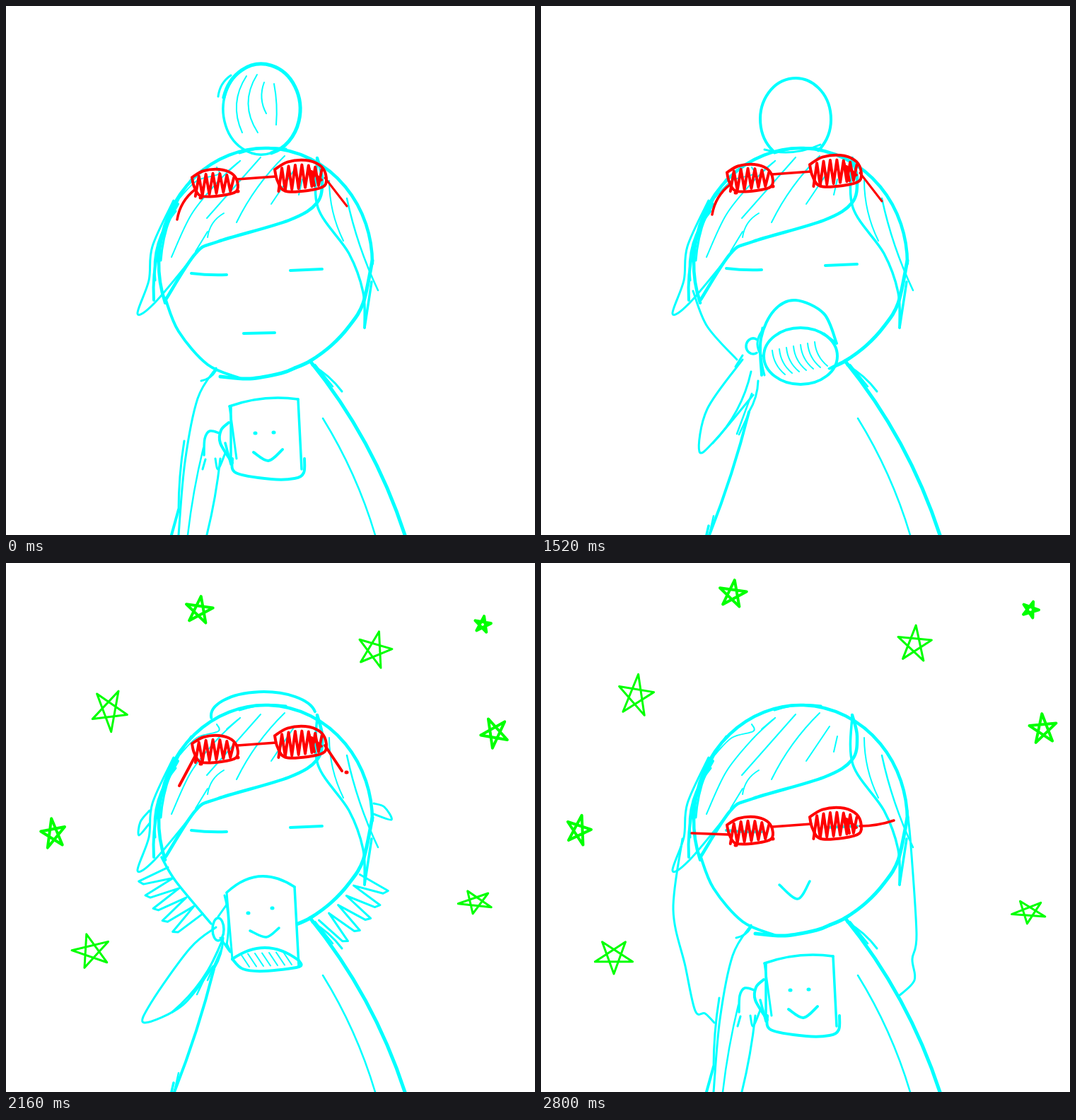
Recreate the animation shown at these times as an HTML page with a canvas. Size 748 by 748 pixels, loop 2.96 s.

```html
<!DOCTYPE html>
<html lang="en">
<head>
<meta charset="utf-8">
<title>Morning coffee</title>
<style>
html, body { margin: 0; width: 100%; height: 100%; overflow: hidden; background: #fff; }
canvas { display: block; width: 100vmin; height: 100vmin; }
</style>
</head>
<body>
<canvas id="stage" width="748" height="748"></canvas>
<script>
const ctx = document.getElementById('stage').getContext('2d');
const CYAN = '#0ff', RED = '#f00', GREEN = '#0f0';
const LOOP = 2960, RAD = Math.PI / 180;

function ink(width, trace) {
  ctx.beginPath();
  trace();
  ctx.lineWidth = width;
  ctx.stroke();
}

const pairs = nums => nums.flatMap((n, i) => i % 2 ? [] : [[n, nums[i + 1]]]);

// Smooth stroke through a few points.
function line(width, ...nums) {
  const pts = pairs(nums);
  const at = i => pts[Math.max(0, Math.min(pts.length - 1, i))];
  ink(width, () => {
    ctx.moveTo(...pts[0]);
    for (let i = 0; i < pts.length - 1; i++) {
      const [a, b, c, d] = [at(i - 1), at(i), at(i + 1), at(i + 2)];
      ctx.bezierCurveTo(b[0] + (c[0] - a[0]) / 6, b[1] + (c[1] - a[1]) / 6,
        c[0] - (d[0] - b[0]) / 6, c[1] - (d[1] - b[1]) / 6, ...c);
    }
  });
}

const poly = (width, pts) => ink(width, () => pts.forEach(p => ctx.lineTo(...p)));

// Single bend between two points.
function bow(width, x1, y1, x2, y2, bulge = 0) {
  const dx = x2 - x1, dy = y2 - y1, k = 2 * bulge / Math.hypot(dx, dy);
  ink(width, () => {
    ctx.moveTo(x1, y1);
    ctx.quadraticCurveTo((x1 + x2) / 2 + dy * k, (y1 + y2) / 2 - dx * k, x2, y2);
  });
}

const arc = (width, x, y, rx, ry, from = 0, to = 360) =>
  ink(width, () => ctx.ellipse(x, y, rx, ry, 0, from * RAD, to * RAD));

const dot = (x, y) => bow(5, x, y, x + 1, y);

function blank(...nums) {
  ctx.beginPath();
  pairs(nums).forEach(p => ctx.lineTo(...p));
  ctx.fill();
}

function hatch(n, x, y, stepX, stepY, w, h, bulge) {
  for (let i = 0; i < n; i++) {
    const px = x + i * stepX, py = y + i * stepY;
    bow(2, px, py, px + w, py + h, bulge);
  }
}

const onHead = (deg, k) => [367 + 151 * k * Math.cos(deg * RAD), 364 + 163 * k * Math.sin(deg * RAD)];

// Pointed locks along the head: each leaves at one angle, returns at the next.
function spikes(width, from, to, n, reach) {
  const step = (to - from) / n;
  const pts = [onHead(from, 1)];
  for (let i = 0; i < n; i++) {
    const deg = from + step * i;
    pts.push(onHead(deg, reach), onHead(deg + step * .3, reach - .03), onHead(deg + step, 1));
  }
  poly(width, pts);
}

function head() {
  arc(4.5, 367, 364, 151, 163, 160, 360);
  line(5, 518, 360, 505, 420, 485, 453, 460, 480, 430, 502, 408, 512);
  bow(3, 330, 208, 396, 202, 4);
}

function locks() {
  line(3, 237, 275, 207, 340, 202, 388, 186, 435, 210, 420, 262, 358);
  bow(4, 243, 280, 209, 416, -11);
  bow(3, 240, 290, 211, 388, -11);
  bow(3, 262, 245, 219, 360, -9);
  line(4.5, 226, 415, 268, 350, 300, 333, 400, 303, 440, 278, 447, 245, 440, 215);
  line(3.5, 440, 215, 441, 285, 485, 350, 505, 405, 507, 455);
  bow(3.5, 507, 455, 517, 390);
  bow(2, 457, 247, 477, 332, -5);
  bow(2.5, 482, 272, 526, 402, -4);
}

function strands() {
  line(2, 245, 272, 270, 247, 300, 238, 298, 228);
  line(2, 234, 355, 262, 295, 300, 248, 331, 219, 312, 235);
  bow(2, 284, 300, 360, 214);
  bow(2, 285, 327, 308, 293, 5);
  bow(2, 268, 347, 285, 319);
  bow(2, 326, 306, 394, 212, 5);
  bow(2, 375, 280, 408, 231);
  bow(2, 414, 267, 419, 245);
}

function rightArm() {
  bow(5, 430, 502, 564, 748, 13);
  bow(3, 433, 508, 475, 545, 3);
  bow(2.5, 437, 507, 462, 538);
  bow(2.5, 448, 583, 522, 748, 6);
}

const chin = () => line(5, 408, 512, 390, 519, 345, 527, 303, 524);
const jaw = () => line(4, 225, 413, 244, 460, 285, 507, 330, 526);
const jawOpen = () => line(4, 219, 412, 250, 473, 313, 521);
const jawThin = () => line(3, 215, 403, 235, 453, 277, 500);
const jawLow = () => line(3.5, 220, 416, 240, 450, 290, 510);
const mouth = () => bow(4, 336, 463, 380, 462);
const smileWide = () => line(3, 334, 451, 367, 472, 390, 444);
const smile = () => line(3.5, 337, 455, 363, 475, 380, 450);

function eyes() {
  bow(4, 262, 378, 312, 380, -1);
  bow(4, 402, 374, 447, 372);
}

function bunRound() {
  arc(5, 361, 146, 55, 64, -165, 75);
  arc(3.5, 361, 146, 54, 64, 75, 250);
  bow(3, 300, 128, 318, 98, 4);
  bow(2, 340, 99, 334, 179, -11);
  bow(2, 355, 97, 356, 179, -13);
  bow(2, 365, 108, 368, 152, -5);
  bow(2, 379, 110, 382, 168, 2);
}

function bunPlain() {
  arc(4, 360, 160, 50, 58, 130, 410);
  bow(3, 316, 203, 395, 196, -7);
}

function bunSquat() {
  arc(4, 358, 178, 48, 58, 150, 390);
  bow(3, 312, 205, 395, 196, -5);
}

function bunCone() {
  line(4, 302, 217, 311, 195, 320, 160, 357, 132, 392, 160, 405, 192, 420, 207);
  bow(2, 325, 173, 323, 207);
  bow(2, 352, 148, 345, 185, -4);
  bow(2, 366, 165, 371, 182);
  bow(2, 378, 163, 391, 185, 3);
  bow(3, 312, 205, 395, 196, -5);
}

const bunLow = () => arc(4, 362, 212, 70, 54, 175, 365);
const bunFlat = () => arc(4, 364, 216, 74, 34, 175, 350);
const bunGone = () => arc(3.5, 364, 220, 74, 29, 180, 340);

function tufts() {
  spikes(2.5, 155, 126, 3, 1.1);
  spikes(2.5, 28, 60, 3, 1.12);
}

const spikesLeft = () => spikes(3, 156, 126, 5, 1.3);
const spikesRight = () => spikes(3, 28, 60, 5, 1.3);

function wings() {
  line(3, 203, 350, 190, 366, 188, 385, 203, 368);
  line(3, 520, 340, 535, 345, 545, 363, 520, 355);
}

function shag() {
  line(3, 205, 350, 192, 370, 187, 433, 205, 425, 232, 395);
  line(3, 200, 430, 187, 515, 196, 518, 212, 463, 210, 485, 219, 493, 228, 540, 240, 524, 268, 565);
  line(3.5, 520, 335, 530, 375, 519, 400, 528, 465, 520, 462, 518, 490, 508, 488, 515, 530, 492, 515);
  line(3, 432, 507, 460, 537, 480, 545, 507, 587, 500, 545);
}

function hair(length) {
  ctx.translate(0, 390);
  ctx.scale(1, length);
  line(3, 200, 0, 187, 100, 204, 180, 218, 243, 232, 247, 245, 260);
  line(3, 518, -40, 523, 10, 531, 135, 525, 170, 528, 200, 505, 223);
}
const midHair = () => hair(.84);
const longHair = () => hair(1);

function hem() {
  bow(3.5, 237, 735, 234, 748);
  bow(2.5, 244, 721, 238, 748);
}

function torso() {
  bow(4, 294, 574, 238, 748, 3);
  bow(3, 307, 530, 294, 574, 3);
}

function shoulder() {
  line(3, 297, 512, 271, 555, 253, 645, 244, 748);
  bow(3, 276, 530, 297, 515, -3);
  bow(3, 252, 615, 244, 715, -2);
  bow(4, 244, 712, 234, 748);
}

function forearm() {
  bow(3, 303, 640, 276, 778, 3);
  bow(2.5, 279, 625, 254, 778, -3);
}

function grip() {
  line(3.5, 302, 604, 288, 601, 281, 612, 280, 635);
  line(4, 315, 589, 304, 600, 303, 618, 320, 646);
  line(3, 296, 640, 300, 655, 310, 632);
  bow(3.5, 310, 618, 318, 648);
  bow(3, 278, 655, 282, 641);
}

function armBent() {
  line(3, 283, 525, 240, 600, 212, 690, 220, 731, 280, 670, 305, 605);
  bow(2.5, 280, 545, 215, 720, -12);
  bow(2.5, 218, 715, 300, 600);
  bow(2, 283, 610, 220, 712);
  bow(3, 297, 512, 264, 572, -5);
  bow(2, 261, 512, 266, 515);
  bow(3, 275, 530, 290, 524);
  line(4, 310, 547, 298, 565, 300, 582, 313, 606);
  arc(4, 292, 588, 11, 20);
}

function armHigh() {
  line(3, 285, 500, 235, 570, 224, 630, 248, 612, 300, 550);
  bow(3, 297, 517, 243, 618, 8);
  bow(2.5, 298, 548, 277, 605);
  bow(2.5, 292, 580, 280, 606);
  arc(3.5, 300, 481, 10, 11, 60, 300);
  bow(3, 312, 460, 312, 495, -6);
  bow(3, 275, 510, 285, 494);
}

function armTilt() {
  line(3, 282, 502, 235, 565, 213, 618, 250, 600, 302, 555);
  bow(3, 305, 493, 238, 612, 12);
  arc(3, 301, 480, 11, 12, 60, 290);
  bow(3, 315, 457, 318, 487, -9);
  bow(3, 301, 463, 305, 491, -3);
}

function armLow() {
  line(3, 297, 515, 260, 545, 205, 622, 196, 650, 250, 625, 293, 570);
  bow(3, 305, 535, 235, 635, 8);
  bow(2.5, 303, 540, 270, 610);
  bow(2.5, 305, 545, 285, 590);
  arc(3.5, 300, 518, 8, 16);
  bow(3, 312, 483, 300, 500);
  line(3, 303, 530, 317, 550, 312, 538);
}

function cupFront() {
  blank(316, 566, 380, 554, 413, 556, 418, 655, 375, 669, 325, 660);
  bow(3, 316, 566, 326, 640);
  bow(3.5, 318, 567, 318, 646);
  bow(3.5, 316, 566, 413, 556, 6);
  bow(3.5, 413, 556, 418, 655);
  line(4, 422, 640, 421, 660, 408, 668, 375, 669, 325, 660, 320, 640);
  dot(352, 604);
  dot(378, 603);
  line(4, 350, 631, 371, 643, 391, 627);
}

function cupTilt() {
  blank(312, 466, 360, 443, 408, 458, 414, 570, 365, 577, 320, 560);
  bow(3.5, 312, 466, 408, 458, 19);
  bow(3.5, 408, 458, 414, 570);
  bow(3, 312, 466, 320, 560);
  bow(3, 309, 470, 312, 540, 4);
  bow(4, 320, 560, 414, 562, 17);
  line(4, 414, 562, 414, 571, 365, 577, 335, 574, 320, 560);
  hatch(7, 332, 553, 10, -.5, 12, 18);
  dot(342, 495);
  dot(376, 488);
  line(3.5, 345, 520, 368, 529, 386, 516);
}

function cupUp() {
  blank(312, 522, 311, 460, 330, 430, 360, 416, 400, 435, 418, 480, 418, 505, 365, 534);
  line(4, 312, 522, 311, 470, 330, 430, 360, 416, 400, 435, 418, 477);
  bow(3, 316, 522, 313, 455, 4);
  arc(4, 367, 495, 52, 40);
  hatch(7, 327, 487, 10, -2, 18, 34, -4);
  bow(3, 400, 463, 418, 477);
}

function cupSnout() {
  blank(317, 490, 324, 440, 362, 418, 403, 445, 413, 480, 385, 518, 330, 513);
  line(4, 317, 490, 324, 440, 362, 418, 403, 445, 415, 461);
  arc(4, 364, 479, 49, 42);
  bow(3, 305, 510, 319, 514, -2);
  bow(2.5, 333, 483, 341, 490, -2);
  bow(2.5, 367, 471, 376, 475, -2);
  bow(4, 392, 514, 432, 502);
}

function lens(x, y, rx, ry, strokes) {
  const outline = [-1, -.4, -.5, -.88, .2, -1, .75, -.7, 1, -.1, .95, .65, .3, .95, -.6, .98, -.9, .3, -1, -.4];
  line(4, ...outline.map((v, i) => i % 2 ? y + v * ry : x + v * rx));
  const scribble = [];
  for (let i = 0; i <= strokes; i++) {
    const k = 2 * i / strokes - 1;
    scribble.push([x + k * rx * .85, y + ry * (i % 2 ? -.7 + .3 * k * k : .8 - .2 * k)]);
  }
  poly(4, scribble);
}

function lenses() {
  lens(295, 250, 32, 19, 11);
  lens(416, 240, 36, 22, 13);
  poly(4, [[428, 228], [436, 254], [432, 234], [446, 246]]);
  dot(275, 271);
  dot(327, 262);
  bow(3.5, 327, 245, 382, 241);
}

function temples() {
  bow(3.5, 268, 259, 242, 302, -5);
  bow(3, 451, 243, 482, 283);
}

function templesBent() {
  bow(4, 268, 259, 245, 302);
  bow(4, 451, 245, 475, 281);
  dot(481, 283);
}

function templesWorn() {
  bow(3, 217, 258, 265, 260);
  bow(3.5, 227, 267, 272, 258, -3);
  bow(3.5, 451, 242, 503, 241);
}

function templesFlat() {
  bow(3.5, 213, 254, 265, 256);
  bow(3.5, 451, 244, 499, 236, -2);
}

const parts = { head, locks, strands, rightArm, chin, jaw, jawOpen, jawThin, jawLow, eyes, mouth, smile, smileWide,
  bunRound, bunPlain, bunSquat, bunCone, bunLow, bunFlat, bunGone, tufts, spikesLeft, spikesRight, wings, shag,
  midHair, longHair, hem, torso, shoulder, forearm, grip, armBent, armHigh, armTilt, armLow,
  cupFront, cupTilt, cupUp, cupSnout, lenses, temples, templesBent, templesWorn, templesFlat };

// near x, y; far x, y; radii; near and far angle of the first tip
const stars = [
  [273, 67, 271, 44, 20, 20, -82, -82], [521, 123, 528, 115, 25, 27, -75, -85],
  [674, 87, 692, 66, 12, 12, -80, -70], [146, 208, 134, 188, 26, 31, -60, -82],
  [691, 240, 710, 235, 20, 22, -45, -95], [67, 383, 53, 378, 18, 22, -99, -75],
  [664, 479, 690, 493, 25, 17, -45, -120], [121, 549, 103, 556, 28, 25, -105, 90]
];

function drawStar([nearX, nearY, farX, farY, rx, ry, nearTurn, farTurn], phase) {
  const near = phase === 'near', turned = phase === 'turned';
  const x = near ? nearX : farX - 3 * turned;
  const y = near ? nearY : farY + 5 * turned;
  const turn = near ? nearTurn : farTurn + 30 * turned;
  ink(rx < 22 ? 4 : 3, () => {
    for (let i = 0; i < 5; i++) {
      const a = (turn + i * 144) * RAD;
      ctx.lineTo(x + rx * Math.cos(a), y + ry * Math.sin(a));
    }
    ctx.closePath();
  });
}

const base = 'rightArm head locks strands ';
const sip = base + 'hem torso ';
const held = dy => ` shoulder forearm:${dy} cupFront:${dy} grip:${dy}`;
const glasses = (dy, arms = 'temples') => ` lenses:${dy} ${arms}:${dy}`;

// start time, parts as name:dy,dx in paint order, star phase
const poses = [
  [0, base + 'bunRound chin eyes mouth jaw' + held(0) + glasses(0)],
  [880, base + 'bunRound chin eyes mouth jawOpen hem cupFront:-42,-4 armBent' + glasses(0)],
  [1040, sip + 'bunRound eyes mouth jawLow cupTilt:32,2 armLow:32,9' + glasses(0)],
  [1200, sip + 'bunRound eyes jawLow cupTilt armLow' + glasses(0)],
  [1360, sip + 'bunRound eyes jawThin cupUp armHigh' + glasses(0)],
  [1520, sip + 'bunPlain eyes:-7 jawThin cupUp armHigh' + glasses(-7)],
  [1680, sip + 'bunSquat eyes:-11 jawThin cupSnout armTilt' + glasses(-11)],
  [1840, sip + 'bunCone eyes:-14 jawThin tufts cupSnout armTilt' + glasses(-14)],
  [2000, sip + 'bunLow eyes:-7 jawThin spikesLeft:-6,-8 spikesRight:-6 wings cupUp armHigh' + glasses(0)],
  [2160, sip + 'bunFlat eyes jawLow spikesLeft spikesRight wings cupTilt armLow' + glasses(13, 'templesBent'), 'near'],
  [2320, sip + 'bunGone eyes mouth jawLow spikesLeft:12,-4 spikesRight:14,4 wings:10 cupTilt:32,2 armLow:32,9' +
    glasses(65, 'templesBent'), 'turned'],
  [2480, base + 'bunGone chin jaw eyes smileWide shag' + held(-27) + glasses(124, 'templesWorn'), 'far'],
  [2640, base + 'chin jaw eyes smile midHair' + held(0) + glasses(126, 'templesWorn'), 'turned'],
  [2800, base + 'chin jaw eyes smile longHair' + held(0) + glasses(128, 'templesFlat'), 'far']
];

function drawPart(token) {
  const [name, shift = '0'] = token.split(':');
  const [dy, dx = 0] = shift.split(',').map(Number);
  ctx.save();
  ctx.translate(dx, dy);
  ctx.strokeStyle = /^(lenses|temples)/.test(name) ? RED : CYAN;
  parts[name]();
  ctx.restore();
}

function draw([, tokens, phase]) {
  ctx.fillStyle = '#fff';
  ctx.fillRect(0, 0, 748, 748);
  ctx.lineCap = ctx.lineJoin = 'round';
  tokens.split(' ').forEach(drawPart);
  ctx.strokeStyle = GREEN;
  if (phase) stars.forEach(star => drawStar(star, phase));
}

const start = performance.now();
let shown;
function tick() {
  const time = (performance.now() - start) % LOOP;
  const pose = poses.findLast(p => p[0] <= time);
  if (pose !== shown) draw(shown = pose);
  requestAnimationFrame(tick);
}
tick();
</script>
</body>
</html>
```
